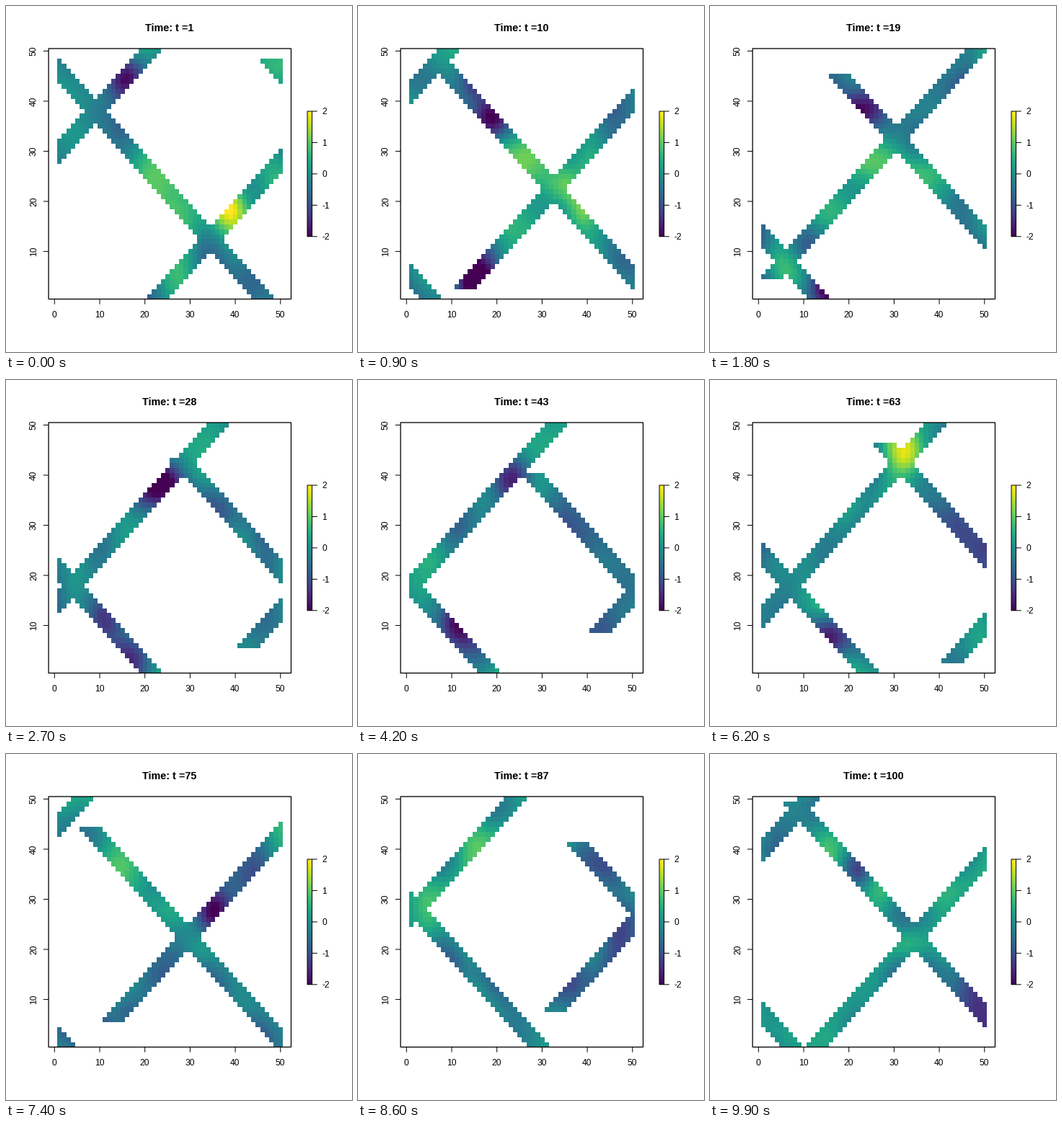
These frames come from a looping animation (480 px wide and 480 px high, 10 s). A matplotlib script:

```python
import numpy as np
import matplotlib
import matplotlib.pyplot as plt
from matplotlib.animation import FuncAnimation
from matplotlib.patches import Rectangle

N, FRAMES = 50, 100
PX = 0.72                                   # one pixel in points
LEFT, RIGHT, TOP, BOTTOM = 59.04, 395.5, 59.04, 406.56
UX, UY = 6.27, (BOTTOM - TOP) / N           # pixels per grid unit
X0 = 67.3                                   # pixel of x = 0
CMAP = matplotlib.colormaps["viridis"].resampled(64)

# strongest warm and cold spots: x, y, time of peak, strength
SPOTS = [
    (39, 18.5, 3, 2.1), (16, 44.5, 1, -2.2), (19, 37, 10, -1.9),
    (15, 4, 10, -2.3), (35, 23, 10, 1.5), (24, 39, 34, -2.2),
    (11, 10, 38, -1.6), (33, 44, 63, 1.5), (16, 8, 66, -1.5),
    (35, 28, 75, -1.9), (33, 21, 88, 1.6), (22, 36, 100, -1.5),
]
SIZE, LIFE = 3, 12
gy, gx = np.mgrid[1:N + 1, 1:N + 1]

# smooth random background drifting in time
rng = np.random.default_rng(7)
WAVES = 60
kx, ky = rng.normal(0, 0.26, (2, WAVES))
kt = rng.normal(0, 0.08, WAVES)
phase = rng.uniform(0, 2 * np.pi, WAVES)
space = gx[..., None] * kx + gy[..., None] * ky + phase


def field(t):
    z = 0.4 * np.sqrt(2 / WAVES) * np.cos(space + kt * t).sum(-1) - 0.1
    for x, y, peak, strength in SPOTS:
        z += strength * np.exp(-((gx - x) ** 2 + (gy - y) ** 2) / (2 * SIZE ** 2)
                               - (t - peak) ** 2 / (2 * LIFE ** 2))
    return z


def swath(t):
    """Cells seen at time t: two five-cell strips stepping through the grid."""
    seen = np.zeros(N * N, bool)
    shift = 10 * (t % 50)
    for start, step in ((11 + shift, N + 1), (2406 - shift, 1 - N)):
        cells = (start + step * np.arange(60)[:, None] + np.arange(5)).ravel()
        seen[cells[(cells >= 1) & (cells <= N * N)] - 1] = True
    return seen.reshape(N, N)


fig = plt.figure(figsize=(4.8, 4.8), dpi=100, facecolor="white")
ax = fig.add_axes([0, 0, 1, 1])


def line(x1, y1, x2, y2):
    ax.plot([x1, x2], [y1, y2], color="black", lw=PX, snap=False,
            solid_capstyle="butt", zorder=4)


def label(x, y, s, size=12, **kw):
    kw = {"ha": "center", **kw}
    return ax.text(x, y, s, fontsize=size * PX, family="Liberation Sans",
                   va="baseline", **kw)


def box(x1, y1, x2, y2, width):
    ax.add_patch(Rectangle((x1, y1), x2 - x1, y2 - y1, fill=False, lw=width * PX,
                           ec="black", snap=False, joinstyle="miter", zorder=5))


def raster(data, extent):
    return ax.imshow(data, cmap=CMAP, vmin=-2, vmax=2, origin="lower",
                     extent=extent, interpolation="nearest", aspect="auto",
                     zorder=2)


image = raster(np.zeros((N, N)), (71, 384, 407, 59))
box(LEFT, TOP, RIGHT, BOTTOM, 1.3)

for v in range(0, 51, 10):
    x = X0 + UX * v
    line(x, BOTTOM, x, BOTTOM + 7.2)
    label(x - 0.5, 432, str(v))
    if v:
        y = BOTTOM - UY * (v - .5)
        line(LEFT - 7.2, y, LEFT, y)
        label(42, y, str(v), rotation=90, rotation_mode="anchor")

# colour key
KX1, KX2, KY1, KY2 = 418, 424.6, 146, 319.8
raster(np.linspace(-2, 2, 64)[:, None], (418, 425, 320, 146))
box(KX1, KY1, KX2, KY2, 1)
for v in range(-2, 3):
    y = (KY1 + KY2) / 2 - v * (KY2 - KY1) / 4
    line(KX2, y, KX2 + 7.2, y)
    label(438.5, y + 4.3, str(v), ha="left")

title = label(226.6, 35, "", 14.4, weight="bold")
ax.set_xlim(0, 480)
ax.set_ylim(480, 0)
ax.axis("off")


def update(i):
    t = i + 1
    image.set_data(np.ma.masked_where(~swath(t), field(t)))
    title.set_text(f"Time: t ={t}")
    return image, title


anim = FuncAnimation(fig, update, frames=FRAMES, interval=100, repeat=True,
                     repeat_delay=0)
plt.show()
```
